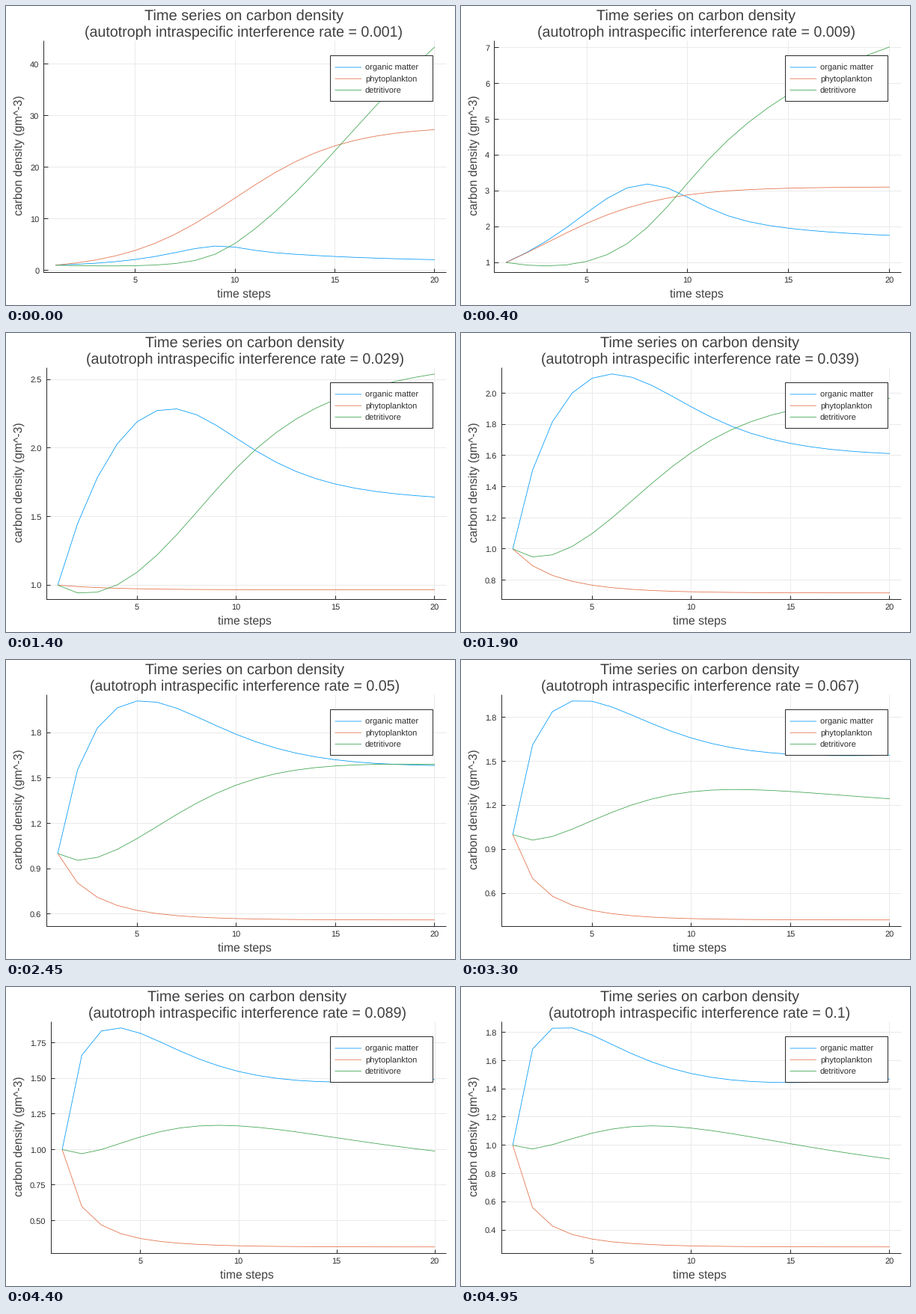
Write a matplotlib script that moves like this. It is 600 by 400 pixels and loops after 5 s.

```python
import math
import numpy as np
import matplotlib.pyplot as plt
from matplotlib.animation import FuncAnimation
from matplotlib.patches import Rectangle

W, H, DPI = 600, 400, 100
PX = 72 / DPI
FRAMES, INTERVAL = 100, 50
TOP, BOTTOM, RIGHT = 46.0, 356.5, 588.1
STEPS = np.arange(1, 21)
X_TICKS = [5, 10, 15, 20]
SERIES = [("organic matter", "#009AFA"),
          ("phytoplankton", "#E36F47"),
          ("detritivore", "#3EA44E")]
INK, SOFT, GRID = "#2b2b2b", "#404040", "#eaeaea"

plt.rcParams["font.family"] = "Liberation Sans"
plt.rcParams["text.hinting"] = "none"

# Model parameters
GROWTH, CAPACITY = 0.367, 0.028
MORTALITY, UPTAKE, ASSIMILATION, LOSS = 0.157, 0.2842, 0.1662, 0.264
RATES = 0.001 * np.arange(1, FRAMES + 1)


def slope(state):
    matter, plant, eater = state
    crowding = GROWTH * RATES / CAPACITY * plant ** 2
    return np.array([
        MORTALITY * plant + crowding + LOSS * eater - UPTAKE * matter * eater,
        GROWTH * plant - crowding,
        (ASSIMILATION * matter - LOSS) * eater,
    ])


def simulate(substeps=20):
    """Runge-Kutta solution for all rates: (time, series, rate)."""
    state = np.ones((3, FRAMES))
    h = 1 / substeps
    out = [state]
    for _ in STEPS[1:]:
        for _ in range(substeps):
            k1 = slope(state)
            k2 = slope(state + h / 2 * k1)
            k3 = slope(state + h / 2 * k2)
            k4 = slope(state + h * k3)
            state = state + h / 6 * (k1 + 2 * k2 + 2 * k3 + k4)
        out.append(state)
    return np.array(out)


def best_ticks(lo, hi):
    """Pick the step with the best mix of count, coverage and niceness."""
    nice = [(1, 1), (5, 0.9), (2, 0.7), (2.5, 0.5), (3, 0.2)]
    best, ticks, step = -math.inf, [], 1
    for power in (1, 0, -1, -2):
        for q, quality in nice:
            s = q * 10.0 ** power
            first, last = math.ceil(lo / s - 1e-9), math.floor(hi / s + 1e-9)
            count = last - first + 1
            if not 4 <= count <= 8:
                continue
            score = (0.25 * (1 - abs(count - 5) / 5)
                     + 0.5 * (hi - lo) / ((count - 1) * s) + 0.25 * quality)
            if score > best + 1e-12:
                best, step = score, s
                ticks = [n * s for n in range(first, last + 1)]
    digits = next(d for d in range(4) if abs(round(step, d) - step) < 1e-9)
    return ticks, [f"{t:.{digits}f}" for t in ticks]


def label_width(text):
    return sum(3.05 if c == "." else 6.1 for c in text)


def segments(pairs):
    """Join segments into one broken line; the half pixel suits snapping."""
    xs, ys = [], []
    for x0, y0, x1, y1 in pairs:
        xs += [x0 - 0.5, x1 - 0.5, np.nan]
        ys += [y0 - 0.5, y1 - 0.5, np.nan]
    return xs, ys


DATA = simulate()

fig = plt.figure(figsize=(W / DPI, H / DPI), dpi=DPI, facecolor="white")
ax = fig.add_axes([0, 0, 1, 1])
ax.set_xlim(0, W)
ax.set_ylim(H, 0)
ax.axis("off")


def add_line(color, z, xs=(), ys=(), width=1, snap=True):
    return ax.plot(xs, ys, color=color, lw=width * PX, zorder=z, snap=snap,
                   solid_capstyle="butt", solid_joinstyle="round")[0]


def add_curve(color, z, xs=(), ys=()):
    return add_line(color, z, xs, ys, width=0.8, snap=False)


def add_text(x, y, size, text="", color=INK, ha="center", z=4, **kw):
    return ax.text(x, y, text, fontsize=size * PX, color=color, ha=ha,
                   va="baseline", zorder=z, **kw)


grid = add_line(GRID, 1)
axes_lines = add_line(INK, 2)
curves = [add_curve(color, 3) for _, color in SERIES]
title = add_text(0, 19, 20, "Time series on carbon density", SOFT)
subtitle = add_text(0, 41, 19.65, "", SOFT)
x_label = add_text(0, 390, 15.7, "time steps", SOFT)
add_text(21.3, 199.8, 15.7, "carbon density (gm^-3)", SOFT, rotation=90,
         rotation_mode="anchor")
x_texts = [add_text(0, 370, 11, str(t)) for t in X_TICKS]
y_texts = [add_text(0, 0, 11, ha="right") for _ in range(8)]

# Legend
ax.add_patch(Rectangle((433, 66), 137, 61, facecolor="white",
                       edgecolor=INK, lw=PX, zorder=5))
for row, (name, color) in enumerate(SERIES):
    y = 82 + 15.2 * row
    add_curve(color, 6, [439.5, 475], [y, y])
    add_text(480, y + 4.2, 11.1, name, ha="left", z=6)


def draw(i):
    values = DATA[:, :, i]
    pad = 0.03 * (values.max() - values.min())
    lo, hi = values.min() - pad, values.max() + pad
    ticks, labels = best_ticks(lo, hi)
    left = 38.77 + max(map(label_width, labels))

    def to_x(t):
        return left + (t - 0.43) / 20.14 * (RIGHT - left)

    def to_y(v):
        return BOTTOM - (v - lo) / (hi - lo) * (BOTTOM - TOP)

    for k, curve in enumerate(curves):
        curve.set_data(to_x(STEPS), to_y(values[:, k]))

    gx, gy = [to_x(t) for t in X_TICKS], [to_y(t) for t in ticks]
    grid.set_data(*segments([(x, TOP, x, BOTTOM) for x in gx]
                            + [(left, y, RIGHT, y) for y in gy]))
    axes_lines.set_data(*segments(
        [(left, TOP, left, BOTTOM), (left, BOTTOM, RIGHT, BOTTOM)]
        + [(x, BOTTOM, x, BOTTOM - 5.5) for x in gx]
        + [(left, y, left + 5.5, y) for y in gy]))

    for text, x in zip(x_texts, gx):
        text.set_x(x - 0.5)
    for k, text in enumerate(y_texts):
        shown = k < len(ticks)
        text.set_visible(shown)
        if shown:
            text.set_position((left - 6.7, gy[k] + 4))
            text.set_text(labels[k])

    middle = (left + RIGHT) / 2 - 2
    for text in (title, subtitle, x_label):
        text.set_x(middle)
    subtitle.set_text(
        f"(autotroph intraspecific interference rate = {RATES[i]:.3g})")
    return []


anim = FuncAnimation(fig, draw, frames=FRAMES, interval=INTERVAL, repeat=True)
plt.show()
```
